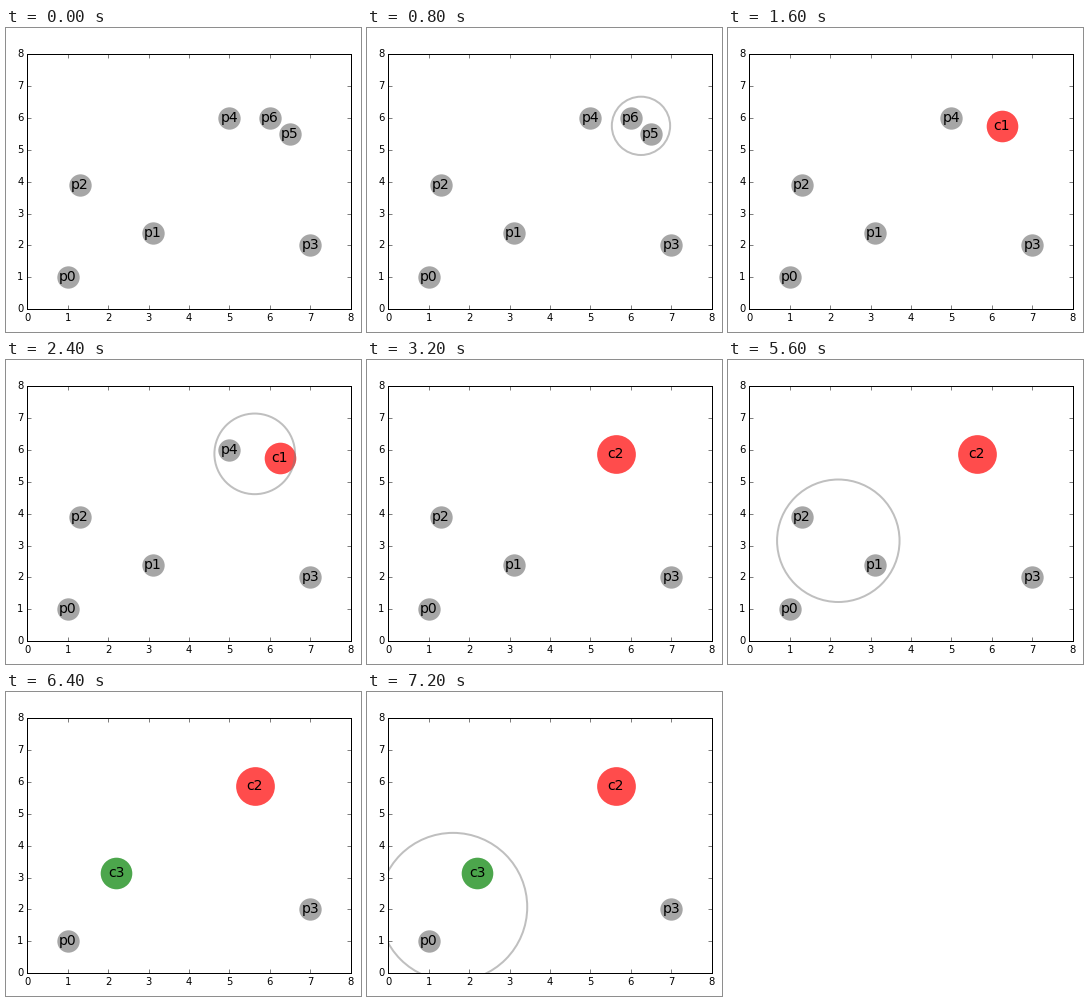
These frames come from a looping animation (355 px wide and 304 px high, 8000 ms). A matplotlib script:

```python
import matplotlib.pyplot as plt
from matplotlib.animation import FuncAnimation

W, H, DPI = 355, 304, 72
LEFT, TOP, RIGHT, BOTTOM = 21.4, 26.1, 344.7, 281.2  # plot area, px from top left
STEP_MS, STEPS = 800, 10

plt.rcParams.update({
    "font.family": "DejaVu Sans",
    "font.size": 10,
    "axes.linewidth": 1.0,
})

fig = plt.figure(figsize=(W / DPI, H / DPI), dpi=DPI, facecolor="white")
ax = fig.add_axes([LEFT / W, 1 - BOTTOM / H, (RIGHT - LEFT) / W, (BOTTOM - TOP) / H])
ax.set(xlim=(0, 8), ylim=(0, 8), xticks=range(9), yticks=range(9))
ax.tick_params(direction="in", top=True, right=True, length=4, width=0.5, pad=4)
for label in ax.get_yticklabels():
    label.set_va("center")

parts = []  # (artist, first step, step after last)


def add_node(name, x, y, start=0, end=STEPS, color="gray", area=500):
    dot = ax.scatter([x], [y], s=area, c=color, alpha=0.7, linewidths=0)
    text = ax.text(x, y, name, size=14, ha="center", va="center")
    parts.extend([(dot, start, end), (text, start, end)])


def add_ring(x, y, area, step):
    ring = ax.scatter([x], [y], s=area, facecolors="none", edgecolors="gray",
                      alpha=0.5, linewidths=2)
    parts.append((ring, step, step + 1))


add_node("p0", 1, 1)
add_node("p1", 3.1, 2.4, end=8)
add_node("p2", 1.3, 3.9, end=8)
add_node("p3", 7, 2)
add_node("p4", 5, 6, end=4)
add_node("p5", 6.5, 5.5, end=2)
add_node("p6", 6, 6, end=2)

# Each merge: ring around the closest pair, then the merged cluster
add_ring(6.25, 5.75, 3400, 1)
add_node("c1", 6.25, 5.75, 2, 4, "red", 1000)
add_ring(5.625, 5.875, 6500, 3)
add_node("c2", 5.625, 5.875, 4, color="red", area=1500)
add_ring(2.2, 3.15, 15000, 7)
add_node("c3", 2.2, 3.15, 8, color="green", area=1000)
add_ring(1.6, 2.075, 22000, 9)


def draw(step):
    for artist, start, end in parts:
        artist.set_visible(start <= step < end)
    return [artist for artist, _, _ in parts]


anim = FuncAnimation(fig, draw, frames=STEPS, interval=STEP_MS,
                     repeat=True, repeat_delay=0, blit=False)
plt.show()
```
